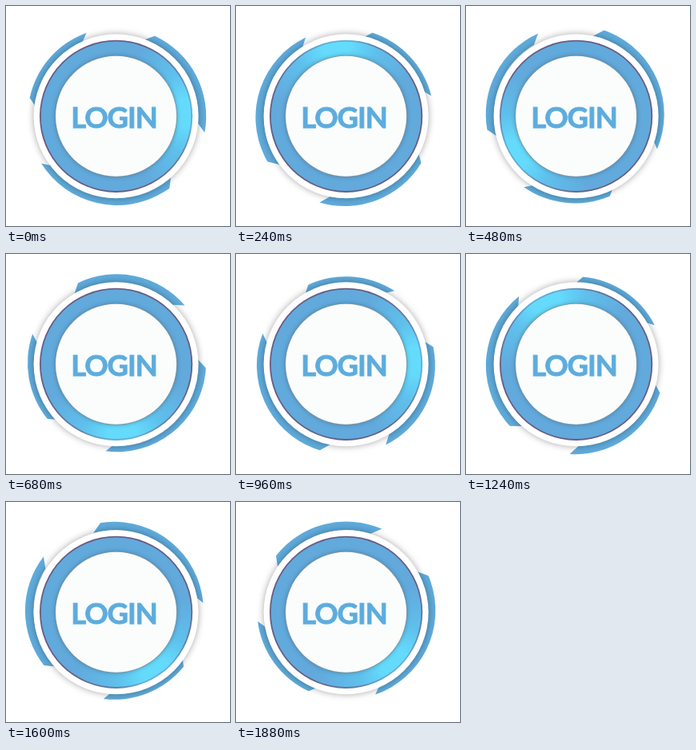
Write an HTML page with a canvas that moves like this. It is 280x276 px and loops after 1.92 s.

```html
<!DOCTYPE html>
<html lang="en">
<head>
<meta charset="utf-8">
<style>
  html, body { margin: 0; width: 100%; height: 100%; overflow: hidden; background: #fff; }
  canvas { position: absolute; left: 0; top: 0; width: 280px; height: 276px; }
  b {
    position: absolute; left: 0; top: 115.5px; width: 270px;
    text-align: center; color: #5dacde; letter-spacing: -1.1px;
    -webkit-text-stroke: .9px #5dacde;
    font: 700 36.5px/46px Lato, Carlito, sans-serif;
  }
</style>
</head>
<body>
<canvas width="280" height="276"></canvas>
<b>LOGIN</b>
<script>
const ctx = document.querySelector('canvas').getContext('2d');
const LOOP = 1920, STEP = 40, CX = 137.6, CY = 138.3;
const rad = deg => deg * Math.PI / 180;

// Poses as [ms, degrees], counter-clockwise from the right
const arcKeys = [[0, 143], [240, 47], [480, -92], [960, -270], [1240, -300], [1600, -424], [1880, -500]];
const glowKeys = [[0, 3], [240, 98], [480, 212], [960, 363], [1240, 475], [1600, 664], [1880, 674]];

// Blue outer arcs as [start, end] on the turning ring
const arcs = [[-33, 31], [69, 169], [206.5, 288]];
const SLANT = 6;

function pose(keys, t) {
  let i = 1;
  while (i < keys.length - 1 && t > keys[i][0]) i++;
  const [t0, a] = keys[i - 1], [t1, b] = keys[i];
  return a + (b - a) * (t - t0) / (t1 - t0);
}

function disc(r, fill, shadow, blur) {
  ctx.save();
  ctx.shadowColor = shadow || 'transparent';
  ctx.shadowBlur = blur || 0;
  ctx.fillStyle = fill;
  ctx.beginPath();
  ctx.arc(CX, CY, r, 0, 7);
  ctx.fill();
  ctx.restore();
}

// The ring turns slightly off its centre, and its cuts lean
function drawArcs(turn) {
  const lean = rad(turn + 198);
  const x = 136.8 + 2 * Math.cos(lean), y = 137.8 - 2 * Math.sin(lean);
  ctx.fillStyle = '#5fabdb';
  for (const [from, to] of arcs) {
    const a = -rad(turn + from), b = -rad(turn + to), s = rad(SLANT);
    ctx.beginPath();
    ctx.arc(x, y, 111.5, a, b + s, true);
    ctx.arc(x, y, 101, b, a - s);
    ctx.fill();
  }
}

// Conic blend from base to peak, with the peak at the given angle
function sweep(angle, base, mid, peak) {
  const g = ctx.createConicGradient(rad(180 - angle), CX, CY);
  const stops = [[0, base], [.31, base], [.41, mid], [.47, peak], [.53, peak], [.59, mid], [.69, base], [1, base]];
  for (const [at, color] of stops) g.addColorStop(at, color);
  return g;
}

function draw(now) {
  const t = Math.floor(now % LOOP / STEP) * STEP;
  const angle = pose(glowKeys, t);
  ctx.fillStyle = '#fff';
  ctx.fillRect(0, 0, 280, 276);
  drawArcs(pose(arcKeys, t));
  disc(103, '#fff', 'rgba(0,0,0,.35)', 8);
  disc(95.6, sweep(angle, '#66587c', '#6280a8', '#62b4dc'));
  disc(93.8, sweep(angle, '#62a9dc', '#5fc0ec', '#65dbfc'), 'rgba(98,130,180,.8)', 1.5);
  disc(76.3, '#7f97a3', 'rgba(50,90,120,.5)', 5);
  disc(75.5, '#fafdfc');
}

const start = performance.now();
function tick() {
  draw(performance.now() - start);
  requestAnimationFrame(tick);
}
tick();
</script>
</body>
</html>
```
